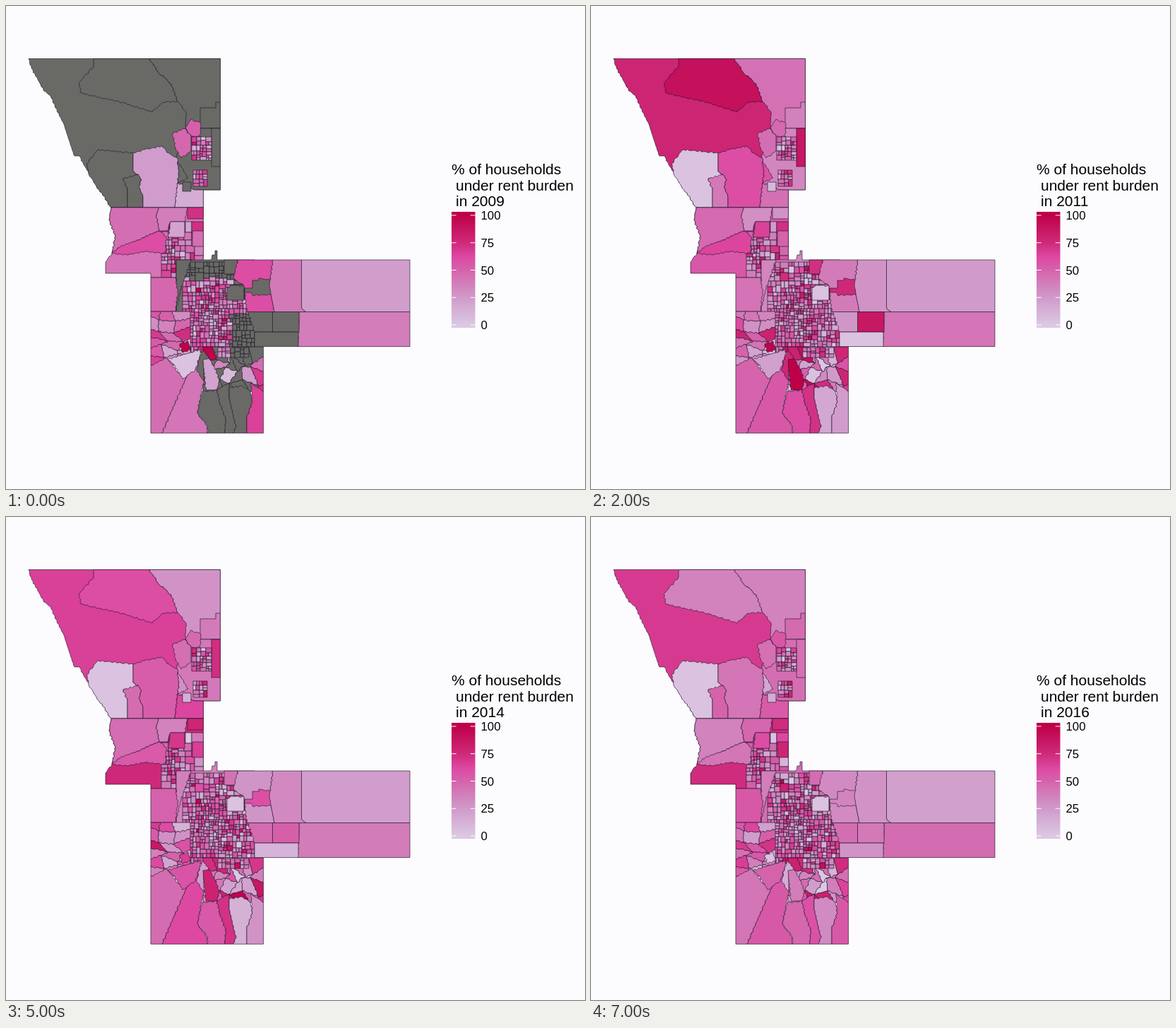
These frames come from a looping animation (820x683 px, 8000 ms). An HTML page:

```html
<!DOCTYPE html>
<html lang="en">
<head>
<meta charset="utf-8">
<title>Rent burden by year</title>
<style>
  html, body { margin: 0; width: 100%; height: 100%; overflow: hidden; background: #fcfcff; }
  svg { display: block; width: 820px; height: 683px; font-family: "Liberation Sans", Arial, sans-serif; }
  #map path { stroke: #21182a; stroke-width: .65; stroke-linejoin: round; }
  .title { font-size: 21px; }
  .label { font-size: 16.8px; }
</style>
</head>
<body>
<svg viewBox="0 0 820 683">
  <defs><linearGradient id="ramp" x1="0" y1="1" x2="0" y2="0"></linearGradient></defs>
  <g id="map"></g>
  <g id="legend">
    <text class="title" x="631" y="238">% of households</text>
    <text class="title" x="637" y="260.5">under rent burden</text>
    <text class="title" x="637" y="283" id="year"></text>
    <rect x="631" y="291" width="33.5" height="164" fill="url(#ramp)"/>
  </g>
</svg>
<script>
const STOPS = [[0, 219, 200, 227], [25, 208, 154, 202], [50, 213, 99, 172],
               [62, 221, 72, 162], [75, 206, 42, 122], [100, 191, 0, 73]];
const MISSING = '#696a66';
const YEARS = 8;
const NONE = NaN;
const map = document.getElementById('map');
const legend = document.getElementById('legend');
const yearText = document.getElementById('year');
const areas = [];

function add(parent, tag, attributes) {
  const node = document.createElementNS('http://www.w3.org/2000/svg', tag);
  for (const key in attributes) node.setAttribute(key, attributes[key]);
  return parent.appendChild(node);
}

const mix = (a, b, t) => a + (b - a) * t;

function color(value) {
  if (Number.isNaN(value)) return MISSING;
  const v = Math.max(0, Math.min(100, value));
  const i = Math.max(1, STOPS.findIndex(s => s[0] >= v));
  const [a, b] = [STOPS[i - 1], STOPS[i]];
  const t = (v - a[0]) / (b[0] - a[0]);
  return `rgb(${[1, 2, 3].map(k => Math.round(mix(a[k], b[k], t)))})`;
}

let seed = 20;
function random() {
  seed = (seed * 1664525 + 1013904223) % 4294967296;
  return seed / 4294967296;
}
const spread = amount => (random() + random() + random() - 1.5) * amount;

// Survey lines stay straight; slanted borders meander by position, so neighbours agree.
function outline(points) {
  const path = [];
  points.forEach(([x0, y0], i) => {
    const [x1, y1] = points[(i + 1) % points.length];
    const straight = x0 === x1 || y0 === y1;
    const steps = straight ? 1 : Math.ceil(Math.hypot(x1 - x0, y1 - y0) / 3.5);
    path.push([x0, y0]);
    for (let k = 1; k < steps; k++) {
      const x = mix(x0, x1, k / steps), y = mix(y0, y1, k / steps);
      path.push([x + Math.sin(y * 0.9 + x * 0.2), y + Math.sin(x * 0.8 - y * 0.3)]);
    }
  });
  return `M${path.map(p => p.map(n => n.toFixed(1))).join(' ')}Z`;
}

function paint(points, values) {
  areas.push({ node: add(map, 'path', { d: outline(points) }), fills: values.map(color) });
}

// Values for 2009, 2010, 2013 and 2016; the years between are interpolated.
function region(corners, first, early, middle, late) {
  const values = Array.from({ length: YEARS }, (_, i) =>
    i === 0 ? first : i < 4 ? mix(early, middle, (i - 1) / 3) : mix(middle, late, (i - 4) / 3));
  paint(corners.split(' ').map(p => p.split(',').map(Number)), values);
}

const box = (x0, y0, x1, y1) => `${x0},${y0} ${x1},${y0} ${x1},${y1} ${x0},${y1}`;

function randomValues(variety, missing) {
  const base = 44 + spread(variety);
  return Array.from({ length: YEARS }, (_, i) => i === 0 && missing ? NONE : base + spread(22));
}

// City blocks: split recursively until each is about sizeAt(centre) wide.
function tracts(x, y, w, h, sizeAt, isMissing = () => false) {
  const cx = x + w / 2, cy = y + h / 2;
  if (Math.max(w, h) < sizeAt(cx, cy) * (0.75 + random() * 0.7)) {
    paint([[x, y], [x + w, y], [x + w, y + h], [x, y + h]], randomValues(32, isMissing(cx, cy)));
    return;
  }
  const ratio = 0.35 + random() * 0.3;
  if (w > h) {
    const cut = Math.round(w * ratio);
    tracts(x, y, cut, h, sizeAt, isMissing);
    tracts(x + cut, y, w - cut, h, sizeAt, isMissing);
  } else {
    const cut = Math.round(h * ratio);
    tracts(x, y, w, cut, sizeAt, isMissing);
    tracts(x, y + cut, w, h - cut, sizeAt, isMissing);
  }
}

// Hill country: a lattice with displaced inner corners.
function lattice(x, y, w, h, columns, rows, isMissing) {
  const shift = (index, count) => index > 0 && index < count ? spread(0.6) : 0;
  const corners = Array.from({ length: rows + 1 }, (_, r) =>
    Array.from({ length: columns + 1 }, (_, c) => [
      x + (c + shift(c, columns)) * w / columns,
      y + (r + shift(r, rows)) * h / rows]));
  for (let r = 0; r < rows; r++) {
    for (let c = 0; c < columns; c++) {
      const quad = [corners[r][c], corners[r][c + 1], corners[r + 1][c + 1], corners[r + 1][c]];
      paint(quad, randomValues(42, isMissing && random() < 0.75));
    }
  }
}

// Northern county
region('32,74.5 36,88 50,114 64,130 82,167 97,212 104,212 118,238 149,285 279.5,285 279.5,260 303.5,260 303.5,74.5', NONE, 85, 64, 68);
region('124,74.5 124,85 103,109 106,123 135,130 160,135 207,150 222,136 243,135 234,110 215,93 203,74.5', NONE, 100, 72, 36);
region('203,74.5 303.5,74.5 303.5,173 254,173 255,150 243,135 234,110 215,93', NONE, 53, 25, 36);
region('275,144 297,144 297,136 303.5,136 303.5,173 275,173', NONE, 37, 35, 47);
region('242,212 254,173 303.5,173 303.5,260 268,260 243,250', NONE, 32, 38, 45);
region(box(291, 173, 303.5, 227), NONE, 86, 88, 44);
region('114,223 130,203 180,208 180,234 187,238 183,243 166,244 172,260 172,285 149,285 118,240', NONE, 3, 3, 3);
region('166,244 187,238 192,246 188,256 194,270 194,285 172,285 172,260', NONE, 38, 44, 50);
region('180,208 196,203 220,198 233,210 243,215 245,235 239,285 194,285 194,270 188,256 192,246 187,238 180,234', 24, 60, 58, 42);
region('243,250 268,260 279.5,260 279.5,285 239,285', 15, 32, 68, 54);
region('236,180 253,173 262,183 262,205 248,215 240,200', 48, 45, 45, 44);
region('254,172 262,160 276,166 275,185 262,184', 52, 50, 42, 56);
region('243,220 258,243 243,250 245,235', NONE, 70, 36, 18);
region(box(250, 249, 262, 262), NONE, 8, 12, 15);
tracts(263, 185, 28, 33, () => 7);
tracts(265, 232, 20, 23, () => 8);

// Western county
region('149,285 279.5,285 279.5,359 241,384 205,384 205,378 141,378 141,362 150,350 155,325 146,302', 42, 45, 76, 74);
tracts(220, 305, 59.5, 79, (x, y) => 6 + Math.hypot(x - 235, y - 350) * 0.2);
region('149,285 216,285 213,297 217,318 186,331 150,350 155,325 146,302', 45, 45, 50, 36);
region('150,350 158,342 186,331 217,318 227,326 226,350 197,347 172,352', 60, 65, 60, 42);
region('216,285 257,285 253,305 233,305 228,318 217,318 213,297', 38, 30, 30, 48);
region(box(257, 285, 279.5, 301), 72, 3, 80, 74);
region('233,305 253,305 253,327 230,327', 20, 60, 74, 60);
region(box(264, 318, 279.5, 340), 45, 45, 60, 78);

// Central city: tracts grow with the distance from its centre
region('241,359 290,359 292,352 296,352 296,346 299,346 299,359 352,359 352,490 262,490 241,435', NONE, 35, 30, 45);
tracts(250, 362, 102, 120, (x, y) => 5.5 + Math.hypot(x - 292, y - 435) * 0.055,
  (x, y) => y < 386 || x > 318 && Math.abs(y - 426) > 10);
tracts(262, 482, 60, 8, () => 8);
region('241,359 262,359 248,400 240,432 241,384', NONE, 34, 36, 38);
region(box(309, 359, 328, 379), NONE, 88, 42, 46);
region('328,359 378,359 373,395 380,432.5 341,432.5 337,396 322,385', 60, 46, 25, 32);
region('349,388 358,388 358,385 378,388 378,408 349,409 347,405 338,405 338,399 349,399', NONE, 78, 70, 35);
region('313,398 322,395 337,396 337,416 313,416', NONE, 3, 3, 3);

// Eastern plains
region('378,359 418.5,359 418.5,426 425,432.5 380,432.5 373,395', 40, 25, 35, 28);
region('418.5,359 572,359 572,432.5 425,432.5 418.5,426', 23, 25, 24, 22);
region('416,432.5 572,432.5 572,481.5 413,481.5', 38, 45, 35, 46);
region(box(377.5, 432.5, 415, 461), NONE, 100, 58, 40);
region('342,432.5 377.5,432.5 377.5,461 352,461', NONE, 16, 48, 45);
region(box(352, 461, 414, 481.5), NONE, 3, 3, 28);

// Foothills
region('205,384 240,384 243,405 240,432 205,432', 48, 40, 48, 55);
lattice(205, 432, 56, 76, 3, 6);
region('246,478 258,474 262,486 250,490', 100, 98, 98, 3);

// Southern counties
lattice(279, 482, 85.5, 63, 6, 4, true);
tracts(300, 483, 44, 14, () => 9, x => x > 317);
region('205,508 228,498 243,518 256,524 238,565 221,604 205,604', 45, 50, 48, 42);
region('256,524 274,497 280,530 271,575 285,595 285,604 221,604 238,565', 42, 50, 65, 55);
region('229,500 262,490 276,485 274,497 268,515 250,527 239,508', 3, 3, 60, 50);
region('274,497 279,486 287,498 280,503 280,530 270,515', NONE, 100, 28, 15);
region('279,500 287,498 298,515 302,530 299,543 283,543', 20, 100, 100, 38);
region('271,575 278,545 299,543 303,562 311,585 310,604 285,604 286,595', NONE, 60, 58, 48);
region('299,543 316,533 316,555 326,595 321,604 310,604 311,585 303,562', NONE, 68, 78, 58);
region('316,540 335,537 346,545 349,560 341,582 341,604 321,604 326,595 316,555', NONE, 25, 3, 32);
region('347,533 364.5,545 364.5,604 341,604 341,582 349,560', 65, 28, 15, 55);

// Legend
const ramp = document.getElementById('ramp');
for (const [value] of STOPS) {
  add(ramp, 'stop', { offset: (value * 1.55 + 4) / 164, 'stop-color': color(value) });
}
for (let value = 0; value <= 100; value += 25) {
  const y = 451 - value * 1.55;
  add(legend, 'path', { d: `M631,${y}h6.7M657.8,${y}h6.7`, stroke: '#fcfcff', 'stroke-width': 1 });
  add(legend, 'text', { class: 'label', x: 672.5, y: y + 6 }).textContent = value;
}

let shown = -1;
function frame() {
  const index = Math.floor(performance.now() / 1000) % YEARS;
  if (index !== shown) {
    shown = index;
    yearText.textContent = `in ${2009 + index}`;
    for (const { node, fills } of areas) node.setAttribute('fill', fills[index]);
  }
  requestAnimationFrame(frame);
}
frame();
</script>
</body>
</html>
```
